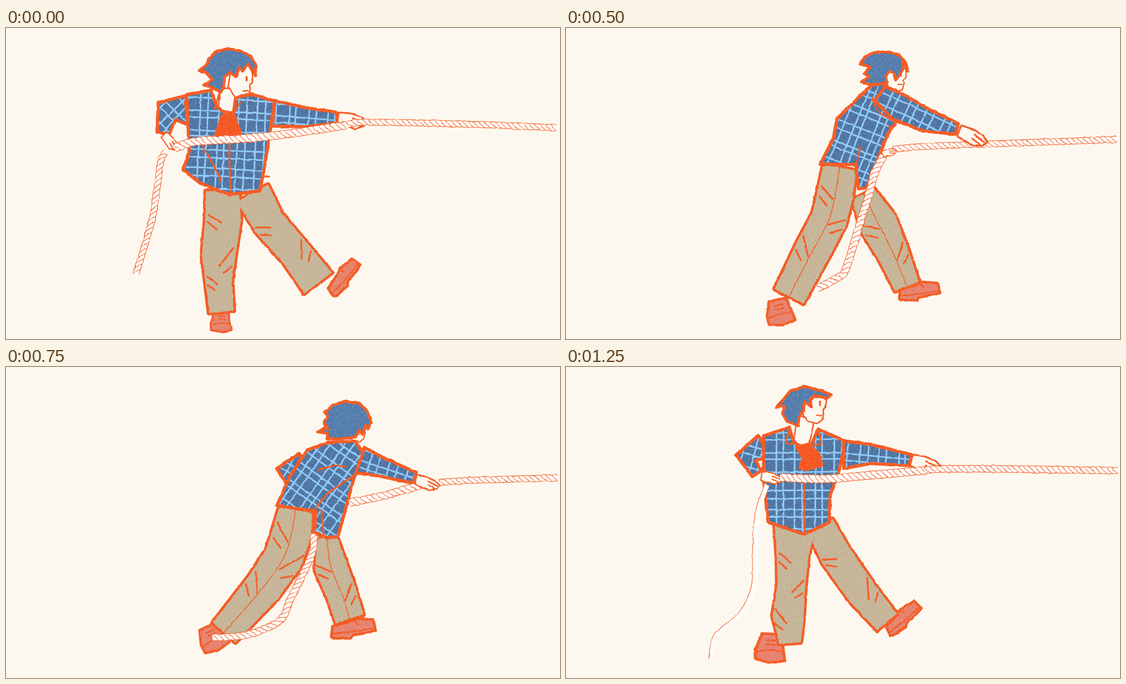
An HTML page for the animation above (1.5 s loop, 998x561 px).

```html
<!DOCTYPE html>
<html lang="en">
<head>
<meta charset="utf-8">
<title>Pulling a rope</title>
<style>
html, body { margin: 0; width: 100%; height: 100%; overflow: hidden; background: #fdf8ef; }
svg { display: block; width: 100vw; height: 100vh; }
path { fill: none; stroke: #f4561c; stroke-linejoin: round; stroke-linecap: round; }
.shirt { fill: #4b719f; stroke-width: 5.5; }
.hair { fill: #4f79aa; stroke-width: 5; }
.legs { fill: #c4b294; stroke-width: 9; paint-order: stroke; }
.shoe { fill: #e67e69; stroke-width: 4.5; }
.skin { fill: #fdf8ef; stroke-width: 2.6; }
.tie { fill: #f4511a; stroke-width: 3; }
.fold { stroke-width: 3.2; }
.thin { stroke-width: 1.5; }
.plaid { stroke: #8ecafa; stroke-width: 2.8; }
.core { stroke: #fffdfa; stroke-linecap: butt; }
.smear { fill: #fffdfa; stroke: none; }
.strand { stroke-width: 1.2; opacity: .9; }
</style>
</head>
<body>
<svg viewBox="0 0 998 561" preserveAspectRatio="none">
<filter id="chalk" filterUnits="userSpaceOnUse" x="0" y="0" width="998" height="561" color-interpolation-filters="sRGB">
<feTurbulence type="fractalNoise" baseFrequency=".09" numOctaves="2" seed="4" result="warp"/>
<feDisplacementMap in="SourceGraphic" in2="warp" scale="3" xChannelSelector="R" yChannelSelector="G" result="rough"/>
<feTurbulence type="fractalNoise" baseFrequency=".25" numOctaves="3" seed="9"/>
<feColorMatrix values="0 0 0 0 1  0 0 0 0 1  0 0 0 0 1  .25 0 0 0 -.08" result="grain"/>
<feComposite in="grain" in2="rough" operator="atop"/>
</filter>
</svg>
<script>
const STEP = 250;

// Parts run from back to front. Limbs are "x,y,half-width" joints.
const poses = [
  [
    ['shoe', 590, 484, -42], ['boot', 388, 512, 0, .78],
    ['legs', ['390,294,30 391,345,32 383,412,30 383,455,24 388,512,22', '444,298,32 474,352,29 522,407,28 562,460,31']],
    ['limb', '404,110,18 396,150,14'], ['face', 434, 92],
    ['hair', '348,77 362,66 366,54 378,43 400,37 422,41 441,51 450,66 449,86 442,74 436,65 426,78 421,70 414,88 404,80 394,88 392,106 388,116 368,106 356,103 372,94 360,80'],
    ['sleeve', '325,148,26 290,150,22 283,190,11'],
    ['body', 3, '326,120 370,112 378,140 396,155 410,152 414,126 440,119 484,132 473,205 463,265 457,294 402,300 350,280 319,256 330,225 329,203'],
    ['sleeve', '482,154,23 540,161,17 596,162,10'],
    ['fold', '402,198 404,298/352,208 370,240 388,276/384,118 376,146/412,128 410,152 422,134/460,268 474,268'],
    ['tie', '388,158 412,156 424,192 376,194'],
    ['rope', 11, '288,224 280,236 272,290 262,350 234,444'],
    ['hand', 284, 193, 45, .85], ['hand', 598, 163, 8, 1.2],
    ['rope', 14, '303,217 340,205 420,200 500,192 614,175'],
    ['rope', 11, '614,176 650,170 850,174 992,180'],
  ], [
    ['shoe', 588, 486, -16], ['boot', 388, 498],
    ['legs', ['448,262,36 437,330,30 424,400,28 404,455,26 391,494,20', '490,278,27 520,345,31 552,410,31 574,460,30']],
    ['limb', '494,90,14 486,124,12'], ['face', 529, 60],
    ['hair', '441,39 458,34 470,21 496,12 520,16 535,32 551,54 538,50 530,38 524,50 518,42 510,64 506,54 498,68 494,60 490,78 486,92 470,84 462,88 469,72 450,68 462,56 446,44'],
    ['sleeve', '422,103,26 375,105,22 352,118,23 348,158,12'],
    ['sleeve', '530,180,12 540,202,14 565,203,10'],
    ['body', 15, '408,79 454,80 462,108 488,128 506,98 532,110 537,166 516,212 510,240 504,272 460,272 370,234 396,160'],
    ['fold', '410,180 408,244/470,180 454,268/456,84 451,112 470,116/506,102 506,130 492,122'],
    ['tie', '441,152 446,134 470,130 496,126 490,150 479,146 474,164 462,152'],
    ['hand', 350, 162, 85, 1.1], ['hand', 566, 203, -8, 1],
    ['rope', 14, '586,206 530,258 480,308 410,358 360,376 330,396 296,444'],
    ['hand', 576, 207, -14, .85],
    ['rope', 11, '612,198 680,192 760,189 860,189 994,188'],
  ], [
    ['shoe', 600, 488, 0], ['boot', 381, 490, -12],
    ['legs', ['536,300,22 562,352,34 590,408,28 614,466,23'], true],
    ['legs', ['493,252,30 485,300,32 474,345,32 445,400,32 402,484,29'], true],
    ['face', 604, 84, .85],
    ['hair', '530,65 540,50 556,44 580,43 600,48 612,62 616,78 606,62 607,74 600,86 594,94 590,82 584,78 576,86 578,100 546,102 532,97 546,88 537,82 548,70'],
    ['body', 22, '575,100 550,104 508,144 488,164 482,198 458,246 522,246 527,290 542,288 580,190 598,165'],
    ['sleeve', '566,118,16 600,143,24 650,167,20 704,182,10'],
    ['fold', '552,126 562,150 594,170/524,244 530,214/582,178 594,176'],
    ['rope', 13, '572,230 556,262 546,300 530,350 504,435 490,450 452,470'],
    ['rope', 11, '588,219 640,214 740,210 992,201'],
    ['hand', 570, 228, -18, .6], ['hand', 708, 186, 22, 1.25],
  ], [
    ['shoe', 586, 486, 0, 1.08], ['boot', 363, 468, -25],
    ['legs', ['578,308,18 585,360,29 605,410,27 619,454,26'], true],
    ['legs', ['522,258,30 514,302,35 500,345,35 463,398,33 393,479,27'], true],
    ['face', 642, 104, .85],
    ['hair', '562,117 574,110 580,112 573,100 580,88 574,82 590,68 612,62 636,66 650,78 658,100 652,112 648,106 642,122 636,114 630,126 600,130 578,130 580,120'],
    ['sleeve', '536,170,16 500,190,14 514,210,8'],
    ['body', 35, '580,136 628,134 656,170 628,196 598,306 576,308 556,298 558,260 488,250 512,196 542,150'],
    ['sleeve', '638,168,24 675,180,17 736,200,10'],
    ['fold', '562,186 590,178 612,180/556,258 580,228 624,198/568,258 572,302'],
    ['rope', 13, '618,245 680,232 748,213'],
    ['rope', 12, '554,302 550,340 512,420 500,450 480,466 430,484 372,488'],
    ['rope', 11, '780,208 850,204 994,200'],
    ['hand', 738, 204, 14, 1.02],
  ], [
    ['shoe', 588, 486, 0], ['boot', 371, 478, -30],
    ['legs', ['562,296,16 575,345,36 604,405,26 615,458,24'], true],
    ['legs', ['510,248,34 502,300,37 486,345,32 452,395,34 402,480,29'], true],
    ['face', 605, 70],
    ['hair', '533,70 535,50 546,34 570,26 592,28 608,40 624,58 618,64 608,56 600,58 598,72 594,62 590,78 584,70 580,90 584,98 552,100 536,92'],
    ['body', 14, '550,102 576,98 600,140 604,250 602,294 562,290 550,246 474,242 494,190 496,172 530,122'],
    ['sleeve', '576,106,14 582,150,17 588,188,19 640,205,12'],
    ['fold', '548,242 562,204/634,196 632,214'],
    ['rope', 11, '653,216 645,270 632,386'],
    ['smear', '582,420 602,406 622,380 638,376 630,396 606,426 590,434'],
    ['rope', 13, '472,460 520,442 594,422'],
    ['rope', 11, '684,206 760,200 980,195'],
    ['hand', 641, 204, 4, 1.05],
  ], [
    ['shoe', 584, 484, -33], ['boot', 371, 482, 4, 1.1],
    ['legs', ['412,288,36 408,345,28 406,395,25 400,450,28 404,498,19', '458,286,25 486,340,28 534,408,27 578,460,23']],
    ['limb', '432,90,16 424,140,14'], ['face', 458, 66],
    ['hair', '378,73 392,58 404,43 430,35 456,42 479,50 470,56 448,52 440,58 442,72 430,62 428,78 420,90 418,106 398,98 390,84 394,70'],
    ['sleeve', '358,142,22 324,164,18 344,192,10'],
    ['body', 0, '356,124 402,109 410,134 424,146 442,140 454,112 504,134 491,190 476,230 474,280 430,302 364,280 356,205'],
    ['sleeve', '500,158,25 550,157,17 621,168,10'],
    ['fold', '429,206 430,300/404,112 396,136 410,138/454,116 460,138 446,140'],
    ['tie', '414,144 436,138 446,146 460,160 462,178 432,186 420,182 426,164'],
    ['trail', '358,212 341,262 336,330 334,395 312,442 267,482 257,526'],
    ['hand', 352, 197, 8, .9], ['hand', 622, 169, 12, 1.25],
    ['rope', 14, '386,199 460,202 540,196 650,186'],
    ['rope', 12, '646,187 676,184 800,184 994,187'],
  ],
];

const svg = document.querySelector('svg');
let clips = 0, seed = 7;

const random = () => (seed = seed * 16807 % 2147483647) / 2147483647;
const parse = text => text.split(' ').map(p => p.split(',').map(Number));
const line = pts => 'M' + pts.join('L');
const polygon = text => line(text.split(' ')) + 'Z';

function add(parent, tag, attrs) {
  const node = document.createElementNS('http://www.w3.org/2000/svg', tag);
  for (const key in attrs) node.setAttribute(key, attrs[key]);
  return parent.appendChild(node);
}

const stroke = (group, kind, d, more) => add(group, 'path', { class: kind, d, ...more });

// Smooth stroke through the given points.
function curve(text) {
  const pts = parse(text);
  let d = 'M' + pts[0];
  for (let i = 0; i < pts.length - 1; i++) {
    const a = pts[i - 1] || pts[i], b = pts[i], c = pts[i + 1], e = pts[i + 2] || c;
    const ctrl = (p, from, to) => p.map((v, k) => v + (to[k] - from[k]) / 6);
    d += `C${ctrl(b, a, c)} ${ctrl(c, e, b)} ${c}`;
  }
  return d;
}

// Places u along and v across the limb at joint i, in half-widths.
function onLimb(joints, i, u, v) {
  const [x, y, w] = joints[i];
  const a = joints[i - 1] || joints[i], b = joints[i + 1] || joints[i];
  const len = Math.hypot(b[0] - a[0], b[1] - a[1]);
  const dx = (b[0] - a[0]) / len * w, dy = (b[1] - a[1]) / len * w;
  return [x + dx * u - dy * v, y + dy * u + dx * v];
}

function limbPath(text) {
  const joints = parse(text);
  const side = v => joints.map((_, i) => onLimb(joints, i, 0, v));
  return line([...side(1), ...side(-1).reverse()]) + 'Z';
}

// Uneven checks inside a piece of cloth, tilted by an angle.
function cloth(group, d, angle) {
  const piece = stroke(group, 'shirt', d);
  const box = piece.getBBox(), id = 'cloth' + clips++;
  add(add(svg, 'clipPath', { id }), 'path', { d });
  const holder = add(group, 'g', { 'clip-path': `url(#${id})` });
  const cx = box.x + box.width / 2, cy = box.y + box.height / 2;
  const reach = Math.hypot(box.width, box.height) / 2;
  const wobble = () => (random() - .5) * 4;
  let checks = '';
  for (let s = -reach, i = 0; s < reach; s += i++ % 2 ? 22 : 13) {
    checks += line([[s + wobble(), -reach], [s + wobble(), 0], [s + wobble(), reach]]);
    checks += line([[-reach, s + wobble()], [0, s + wobble()], [reach, s + wobble()]]);
  }
  stroke(holder, 'plaid', checks, { transform: `translate(${cx} ${cy}) rotate(${angle})` });
  stroke(group, 'shirt', d, { style: 'fill:none' });
}

function creases(group, text, pressed) {
  const joints = parse(text);
  for (let i = 1; i < joints.length - 1; i++) {
    const v = i % 2 ? .85 : -.85, u = .2 + random() * .4;
    stroke(group, 'fold', line([onLimb(joints, i, -u, v), onLimb(joints, i, u, v * .1)]));
    stroke(group, 'fold', line([onLimb(joints, i, u, v), onLimb(joints, i, u + .4, v * .4)]));
  }
  if (pressed) stroke(group, 'thin', curve(joints.map(p => p.slice(0, 2)).join(' ')));
}

// A shape drawn once around its own origin, then placed.
function stamp(group, kind, shape, details, x, y, angle = 0, size = 1) {
  const g = add(group, 'g', { transform: `translate(${x} ${y}) rotate(${angle}) scale(${size})` });
  stroke(g, kind, polygon(shape));
  details.split('/').forEach(d => stroke(g, kind, curve(d), { style: 'fill:none;stroke-width:2.5' }));
}

const draw = {
  legs(g, limbs, pressed) {
    stroke(g, 'legs', limbs.map(limbPath).join(''));
    limbs.forEach(l => creases(g, l, pressed));
  },
  limb: (g, text) => stroke(g, 'skin', limbPath(text)),
  body: (g, angle, text) => cloth(g, polygon(text), angle),
  sleeve(g, text) {
    const joints = parse(text), [x, y] = joints[0], [ex, ey] = joints[joints.length - 1];
    cloth(g, limbPath(text), Math.atan2(ey - y, ex - x) * 180 / Math.PI);
  },
  shoe: (g, ...at) => stamp(g, 'shoe', '0,0 2,-17 28,-24 42,-30 70,-28 74,-10 58,-6 36,-2 32,3 4,3', '2,-5 34,-8 72,-14/40,-26 44,-20', ...at),
  boot: (g, ...at) => stamp(g, 'shoe', '-16,0 16,0 20,22 24,42 0,47 -24,42 -25,26', '-23,30 0,26 22,28/-8,10 8,10/-8,17 8,17', ...at),
  hand: (g, ...at) => stamp(g, 'skin', '0,-9 18,-10 34,-7 44,-1 40,6 28,12 14,10 0,8', '22,-3 40,1/22,3 36,7', ...at),
  face: (g, x, y, size) => stamp(g, 'skin', '-10,-28 6,-24 10,-8 10,6 5,12 6,18 3,30 -6,36 -22,32 -34,14 -30,-10', '0,-4 0,3/-1,-4 -1,3/-7,21 2,21', x, y, 0, size),
  rope(g, width, text) {
    const core = stroke(g, 'core', curve(text), { 'stroke-width': width });
    const length = core.getTotalLength(), count = Math.round(length / 10);
    const step = length / count, half = width / 2;
    const at = (s, side) => {
      const mid = Math.min(Math.max(s, 1), length - 1);
      const p = core.getPointAtLength(mid - 1), q = core.getPointAtLength(mid + 1);
      const len = Math.hypot(q.x - p.x, q.y - p.y) || 1;
      return [(p.x + q.x) / 2 - (q.y - p.y) / len * side, (p.y + q.y) / 2 + (q.x - p.x) / len * side];
    };
    let d = '';
    for (let s = 0, i = 0; i < count; s = ++i * step) {
      const end = s + step;
      for (const side of [-half, half]) {
        d += `M${at(s, side * .9)}Q${at(s + step / 2, side * 1.2)} ${at(end, side * .9)}`;
      }
      d += `M${at(s, -half)}C${at(s + 1, 0)} ${at(end - 2, half * .3)} ${at(end, half)}`;
    }
    stroke(g, 'strand', d);
  },
  trail(g, text) {
    stroke(g, 'core', curve(text), { 'stroke-width': 10, transform: 'translate(4)' });
    stroke(g, 'strand', curve(text));
  },
  fold: (g, text) => text.split('/').forEach(t => stroke(g, 'fold', curve(t))),
};
for (const kind of ['hair', 'tie', 'smear']) draw[kind] = (g, text) => stroke(g, kind, polygon(text));

const groups = poses.map(parts => {
  const group = add(svg, 'g', { filter: 'url(#chalk)' });
  parts.forEach(([kind, ...args]) => draw[kind](group, ...args));
  return group;
});

let shown = -1;
const start = performance.now();

function tick() {
  const now = Math.floor((performance.now() - start) / STEP) % groups.length;
  if (now !== shown) {
    groups.forEach((g, i) => g.setAttribute('display', i === now ? 'inline' : 'none'));
    shown = now;
  }
  requestAnimationFrame(tick);
}
tick();
</script>
</body>
</html>
```
